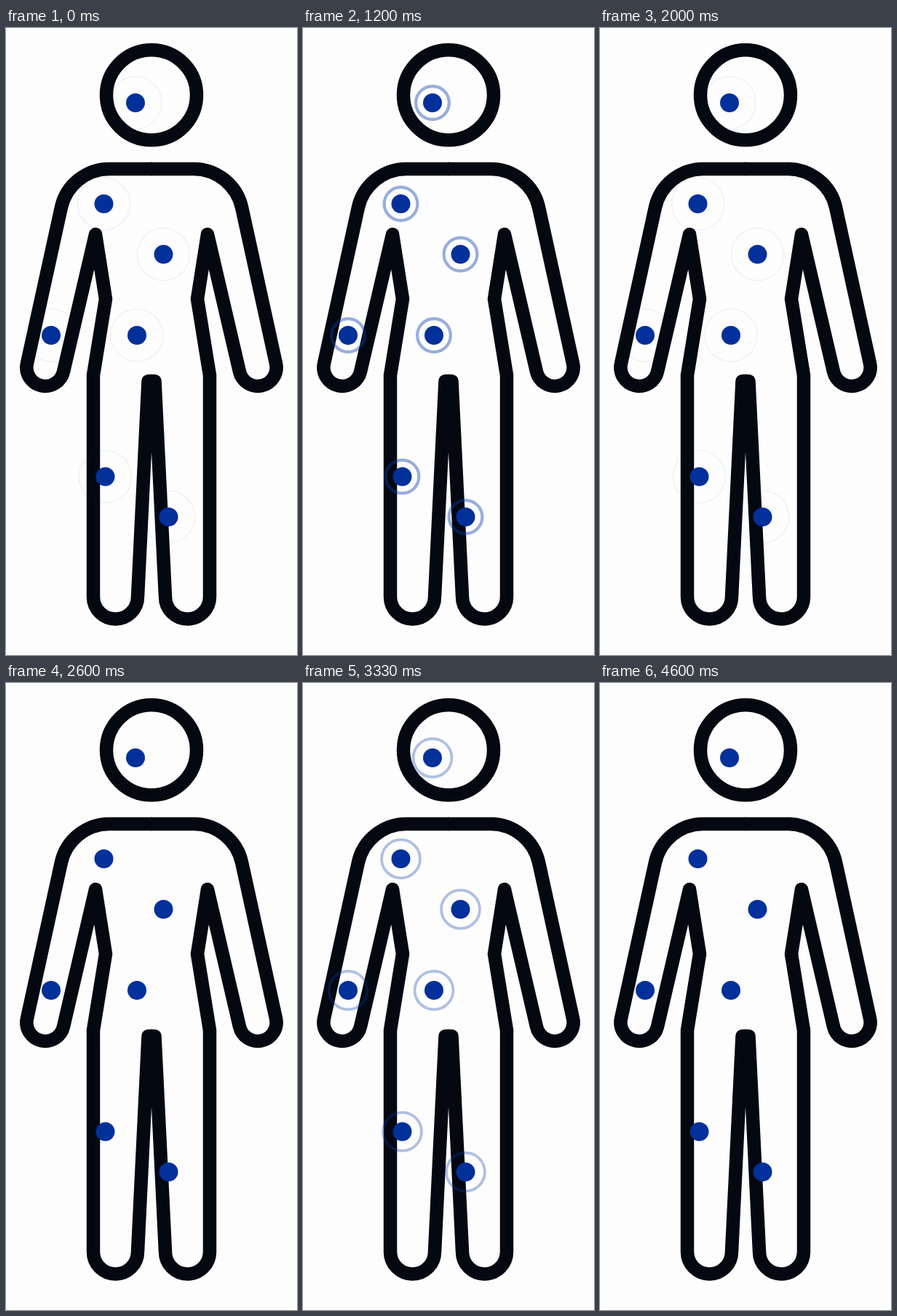
Recreate the animation shown at these times as an HTML page. Size 400 by 863 pixels, loop 4.99 s.

```html
<!DOCTYPE html>
<html lang="en">
<head>
<meta charset="utf-8">
<title>Body with pulsing points</title>
<style>
  html, body { margin: 0; height: 100%; overflow: hidden; background: #fdfdfd; }
  svg { display: block; width: 100%; height: 100%; }
  .body, .ring { fill: none; }
  .body { stroke: #030811; stroke-width: 18.5; stroke-linejoin: round; }
  .ring { stroke: #0a3cac; }
  .dot { fill: #02309a; }
</style>
</head>
<body>
<svg viewBox="0 0 400 863">
  <g class="body">
    <circle cx="200" cy="92.3" r="62"/>
    <path id="half" d="M201 194H142A68 68 0 0 0 75.8 247.4L29 461.5A25.5 25.5 0 0 0 79 473L123 284L137 373L120 478V783A30.5 30.5 0 0 0 181 783L195.5 486H201"/>
    <use href="#half" transform="matrix(-1 0 0 1 400 0)"/>
  </g>
  <g id="rings"></g>
  <g id="dots"></g>
</svg>
<script>
const LOOP = 4990, STEP = 1000 / 15, PERIOD = 2000, START = 600, LAST_END = 4600;
const REST = 0.18; // share of each pulse before the ring shows
const DOT_RADIUS = 13, MAX_RADIUS = 38, RING_WIDTH = 6;
const points = [[178, 103], [134.5, 242], [216.5, 311.5], [62, 423], [180, 423], [136.5, 617.5], [223.5, 673]];

const ringGroup = document.getElementById('rings');
const dotGroup = document.getElementById('dots');

function addCircles(parent, className, radius) {
  return points.map(([cx, cy]) => {
    const circle = document.createElementNS('http://www.w3.org/2000/svg', 'circle');
    const attrs = { class: className, cx, cy, r: radius };
    for (const name in attrs) circle.setAttribute(name, attrs[name]);
    return parent.appendChild(circle);
  });
}

const rings = addCircles(ringGroup, 'ring', 0);
addCircles(dotGroup, 'dot', DOT_RADIUS);

function draw(elapsed) {
  const time = Math.floor((elapsed % LOOP + 4) / STEP) * STEP;
  const progress = ((time - START + PERIOD) % PERIOD) / PERIOD;
  const visible = progress > REST && time < LAST_END;
  const left = 1 - progress;
  const width = RING_WIDTH * left;
  const outer = MAX_RADIUS * (1 - left ** 3);
  ringGroup.setAttribute('opacity', visible ? left ** 2.5 : 0);
  ringGroup.setAttribute('stroke-width', width);
  for (const ring of rings) ring.setAttribute('r', Math.max(0, outer - width / 2));
}

let origin;
function tick(now) {
  origin ??= now;
  draw(now - origin);
  requestAnimationFrame(tick);
}
draw(0);
requestAnimationFrame(tick);
</script>
</body>
</html>
```
